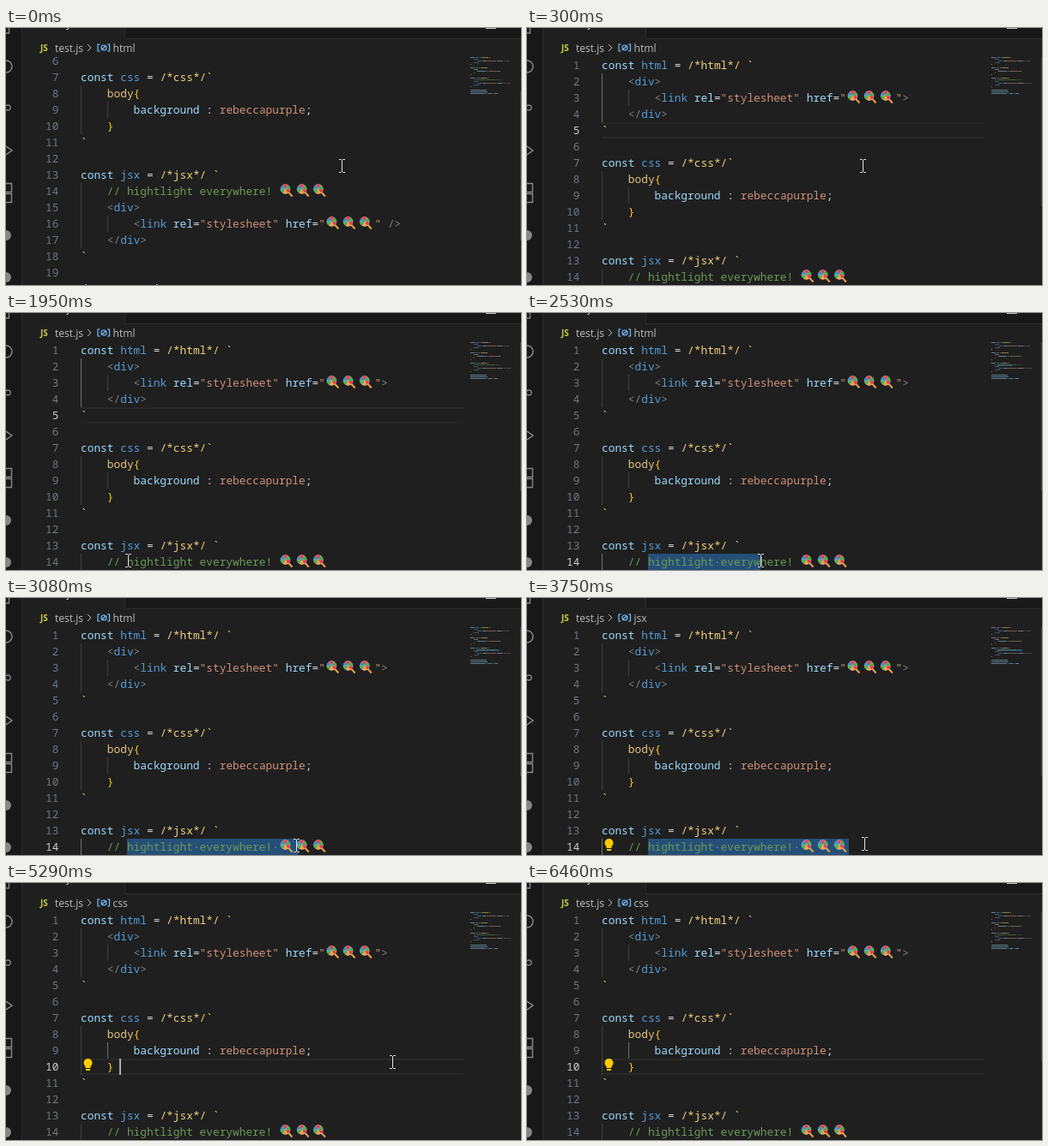
An HTML page with a canvas that plays this animation: 600x300 px, repeating every 6560 ms.

```html
<!DOCTYPE html>
<html lang="en">
<head>
<meta charset="utf-8">
<title>Editor</title>
<style>
html, body { margin: 0; width: 100%; height: 100%; overflow: hidden; background: #1f1f1f; }
canvas { display: block; }
</style>
</head>
<body>
<canvas id="stage" width="600" height="300"></canvas>
<script>
const ctx = document.getElementById('stage').getContext('2d');
const LOOP = 6560, LEFT = 87, TOP = 34, ROW = 19, CHAR = 7.7, CANDY = 19.2;
const MONO = '500 12.83px "Noto Sans Mono", monospace';
const UI = '12.1px "Open Sans", sans-serif';

const COLORS = {
  k: '#9cdcfe', v: '#569cd6', w: '#d4d4d4', y: '#efd27f', g: '#808080',
  s: '#ce9178', c: '#6a9955', b: '#ffc61a', e: '#e6c27c'
};
// Alternating colour key and text; @ is a lollipop
const link = 'g|        <|v|link |k|rel|w|=|s|"stylesheet" |k|href|w|=|s|"@@@"|g|';
const CODE = [
  'k|const |v|html|w| = |y|/*html*/ `', 'g|    <|v|div|g|>', link + '>', 'g|    </|v|div|g|>', 'y|`', '',
  'k|const |v|css|w| = |y|/*css*/`', 'e|    body|b|{', 'k|        background|w| : |s|rebeccapurple|w|;',
  'b|    }', 'y|`', '',
  'k|const |v|jsx|w| = |y|/*jsx*/ `', 'c|    // hightlight everywhere! @@@', 'g|    <|v|div|g|>',
  link + ' />', 'g|    </|v|div|g|>', 'y|`', '',
  'k|document.write(css)', 'k|document.write(html)', 'k|document.write(jsx + html + css)'
].map(line => {
  const parts = line.split('|'), tokens = [];
  for (let i = 0; i + 1 < parts.length; i += 2) tokens.push([COLORS[parts[i]], parts[i + 1]]);
  return tokens;
});

// Pointer moves: first step, last step, step count, x, y
const MOVES = [
  [1150, 1150, 1, 373, 161], [1300, 1950, 6, 142, 289], [2240, 2240, 1, 157, 289],
  [2380, 2380, 1, 212, 289], [2530, 2530, 1, 272, 289], [2670, 2800, 2, 297, 289],
  [2940, 2940, 1, 320, 289], [3080, 3470, 4, 393, 288], [3620, 3620, 1, 393, 287],
  [3880, 4250, 4, 384, 290], [4380, 4770, 4, 450, 209], [5690, 6180, 5, 452, 312]
];

function pointer(t) {
  let x = 391, y = 161;
  for (const [from, to, n, nx, ny] of MOVES) {
    if (t < from) break;
    const span = (to - from) / Math.max(1, n - 1);
    const p = t >= to ? 1 : (Math.floor((t - from) / span) + 1) / n;
    x += (nx - x) * p;
    y += (ny - y) * p;
  }
  return [Math.round(x), Math.round(y)];
}

function box(color, x, y, w, h) {
  ctx.fillStyle = color;
  ctx.fillRect(x, y, w, h);
}

function text(str, x, y, color, font = MONO, align = 'left') {
  ctx.font = font;
  ctx.textAlign = align;
  ctx.fillStyle = color;
  ctx.fillText(str, x, y);
}

function disc(color, x, y, r) {
  ctx.fillStyle = color;
  ctx.beginPath();
  ctx.arc(x, y, r, 0, 7);
  ctx.fill();
}

function path(d, color, width = 1) {
  ctx.strokeStyle = color;
  ctx.lineWidth = width;
  ctx.stroke(new Path2D(d));
}

function lollipop(x, y) {
  const cx = x + 7.5, cy = y - 2.5;
  path(`M${cx + 3} ${cy + 3}L${cx + 8} ${cy + 8.5}`, '#e5a04a', 2);
  ['#e8384f', '#f7a23b', '#3fb54a', '#2f8fd0', '#e8384f', '#3fb54a'].forEach((color, i) => {
    const a = i * Math.PI / 3;
    ctx.fillStyle = color;
    ctx.beginPath();
    ctx.moveTo(cx, cy);
    ctx.arc(cx, cy, 5.6, a, a + Math.PI / 3);
    ctx.fill();
    ctx.strokeStyle = '#f3e3dc';
    ctx.lineWidth = 0.35;
    ctx.stroke();
  });
}

function bulb(y) {
  disc('#ffcc00', 95.5, y - 2, 5);
  box('#ffcc00', 92.5, y + 1, 6, 3);
  box('#ffcc00', 93, y + 5, 5, 2);
}

function drawLine(tokens, y) {
  let x = LEFT;
  for (const [color, str] of tokens) {
    for (const piece of str.split(/(@)/)) {
      if (piece === '@') {
        lollipop(x, y);
        x += CANDY;
      } else {
        text(piece, x, y + 4.5, color);
        x += piece.length * CHAR;
      }
    }
  }
}

function minimap(selected) {
  if (selected > 0) box('#264f78', 548, 60, selected, 2);
  ctx.globalAlpha = 0.5;
  CODE.forEach((tokens, i) => {
    let x = 541;
    for (const [color, str] of tokens)
      for (const ch of str) {
        if (ch !== ' ') box(color, x, TOP + i * 2, 1, 1);
        x += ch === '@' ? 2 : 1;
      }
  });
  ctx.globalAlpha = 1;
}

function chrome(crumb) {
  const ink = '#bdbdbd';
  box('#1f1f1f', 0, 0, 600, TOP);
  box('#181818', 138, 0, 462, 12);
  box('#2b2b2b', 138, 0, 1, 12);
  box('#2b2b2b', 138, 12, 462, 1);
  text('js', 71, -1, '#e0e0e0', UI);
  box('#c5c5c5', 559, 0, 12, 1);
  text('JS', 40, 27, '#cbcb41', 'bold 10px "Open Sans", sans-serif');
  text('test.js', 57, 27.5, ink, UI);
  path('M95 19l4 4l-4 4', ink);
  path('M109.5 19h-2.5v8h2.5M118 19h2.5v8h-2.5M112 25l4-4', '#75beff', 1.2);
  path('M111 23a3 3 0 1 0 6 0a3 3 0 1 0-6 0', '#75beff', 1.2);
  text(crumb, 124.5, 27.5, ink, UI);
}

function sidebar() {
  const ink = '#868686';
  box('#181818', 0, 0, 18, 300);
  box('#2b2b2b', 18, 0, 1, 300);
  path('M0 6h3.5V0', ink, 1.4);
  path('M0 38a7 7 0 0 1 0 14', ink, 1.5);
  path('M0 95a3 3 0 1 0 0-4', ink, 1.4);
  path('M0 138l7 5l-7 5', ink, 1.5);
  path('M0 181.5h6.5v10H0M0 193.5h6.5v10H0', ink, 1.4);
  disc(ink, 0, 242, 6);
  disc(ink, 0, 291, 6);
}

function draw(t) {
  const scroll = t < 300 ? 100 : 0;
  const current = t < 2240 ? 5 : t < 5030 ? 14 : 10;
  const selecting = current === 14;
  const crumb = t < 3210 ? 'html' : t < 5150 ? 'jsx' : 'css';
  const [px, py] = pointer(t);
  const top = n => TOP + (n - 1) * ROW - scroll;
  const guide = (x, a, b, active) => box(active ? '#707070' : '#404040', x, top(a), 1, (b - a + 1) * ROW);

  box('#1f1f1f', 0, 0, 600, 300);
  if (!selecting) {
    box('#282828', LEFT, top(current), 446, 2);
    box('#282828', LEFT, top(current) + 17, 446, 2);
  }

  const start = LEFT + 7 * CHAR;
  const count = selecting ? Math.min(30.4, Math.round((px - start) / CHAR)) : 0;
  if (count) box('#264f78', start, top(14), count * CHAR, ROW);

  guide(87, 2, 4, current === 5);
  guide(118, 3, 3);
  guide(87, 8, 10);
  guide(118, 9, 9, current === 10);
  guide(87, 14, 17, selecting);
  guide(118, 16, 16);

  CODE.forEach((tokens, i) => {
    const y = top(i + 1) + 9.5;
    if (y > 312) return;
    text(i + 1, 61.5, y + 4.5, i + 1 === current ? '#cccccc' : '#6e7681', MONO, 'right');
    drawLine(tokens, y);
  });
  for (const col of [10, 22])
    if (count > col) disc('#8a9aa8', start + (col + 0.5) * CHAR, top(14) + 10, 0.8);

  if (t >= 3620 && t < 5290) bulb(288);
  if (t >= 5290) bulb(212);
  if ((t >= 5030 && t < 5540) || (t >= 6040 && t < 6460)) box('#aeafad', 132, 205, 2, 19);

  minimap(Math.min(29, Math.round(count)));
  box('#434343', 599, TOP + scroll * 0.4, 1, 174);
  chrome(crumb);
  sidebar();
  path(`M${px - 3} ${py - 7.5}h2.5l1 1l1-1h2.5M${px + 0.5} ${py - 7}v14M${px - 3} ${py + 7.5}h2.5l1-1l1 1h2.5`, '#e0e0e0');
}

function tick() {
  draw(performance.now() % LOOP);
  requestAnimationFrame(tick);
}
tick();
</script>
</body>
</html>
```
